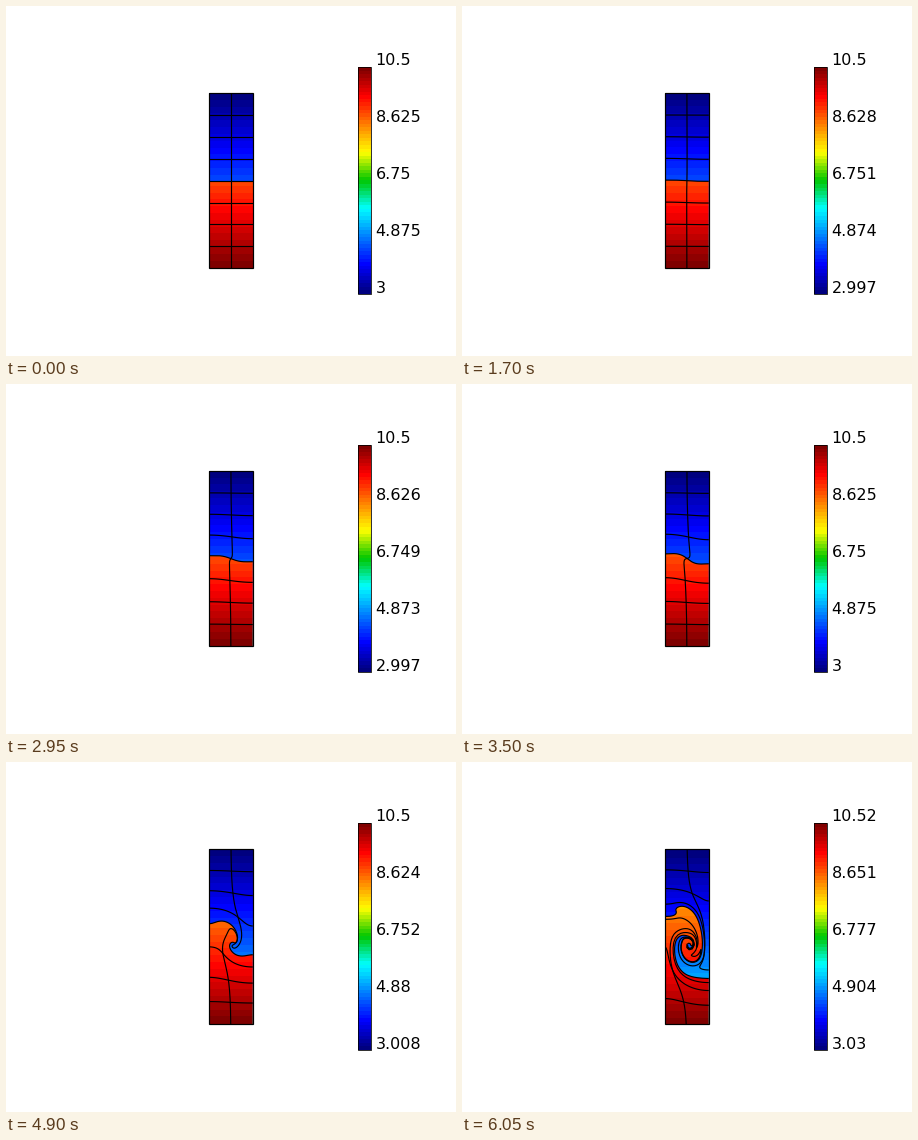
These frames come from a looping animation (450x350 px, 7100 ms). A matplotlib script:

```python
import numpy as np
import matplotlib.pyplot as plt
from matplotlib.animation import FuncAnimation
from matplotlib.colors import LinearSegmentedColormap
from matplotlib.patches import Rectangle
from matplotlib.path import Path

W, H, DPI = 450, 350, 100
PX = 72 / DPI                      # one pixel in points
CX, CY, SCALE = 224.9, 174.7, 87.5  # domain centre and pixels per unit
LEFT, RIGHT = CX - SCALE / 4, CX + SCALE / 4
TOP, BOTTOM = CY - SCALE, CY + SCALE
BAR = (352.3, 365, 61.3, 288.3)
FRAMES, INTERVAL, HOLD, STEPS = 142, 50, 21, 100

# Growth of the interface (left rise plus right fall, px) and value range.
KEYS = [0, 13, 38, 60, 77, 91, 100]
GROWTH = [0, 1.2, 6, 16.2, 31, 48.7, 62]
LOW_KEYS = [3, 2.9972, 2.997, 3.003, 3.008, 3.021, 3.0302]
HIGH_KEYS = [0, 7, 13, 38, 60, 68, 76, 77, 91, 100]
HIGHS = [10.5, 10.508, 10.5047, 10.5017, 10.499, 10.4935,
         10.4958, 10.496, 10.5048, 10.5243]

# Two-fluid vortex sheet, heavy fluid on top, mirrored at both side walls.
K = 2 * np.pi
N = 161
DA = 0.5 / (N - 1)
BLOB = 0.5 * (K * 0.035) ** 2
ATWOOD, GRAVITY, DT = 1 / 3, 1.2, 0.01
PUSHES = [(1, 0.0163), (3, -0.0016)]  # wave number, speed


def velocity(pts, sheet, strength):
    x, y = K * pts.T
    a, b = K * sheet.T
    ch = np.outer(np.cosh(y), np.cosh(b)) - np.outer(np.sinh(y), np.sinh(b))
    sh = np.outer(np.sinh(y), np.cosh(b)) - np.outer(np.cosh(y), np.sinh(b))
    cc, ss = np.outer(np.cos(x), np.cos(a)), np.outer(np.sin(x), np.sin(a))
    sc, cs = np.outer(np.sin(x), np.cos(a)), np.outer(np.cos(x), np.sin(a))
    near = strength / (2 * (ch - cc - ss + BLOB))
    far = strength / (2 * (ch - cc + ss + BLOB))
    u = -(sh * (near - far)).sum(axis=1)
    v = (near * (sc - cs) - far * (sc + cs)).sum(axis=1)
    # initial push, spread smoothly around the interface
    for n, speed in PUSHES:
        depth = 1.7 * n * pts[:, 1]
        push = speed / np.cosh(depth) ** 3.7
        u += push * np.tanh(depth) * np.sin(n * x)
        v += push * np.cos(n * x)
    return np.column_stack([u, v])


def start_lines():
    """Interface first, then the other level lines, then the centre line."""
    lines = [np.column_stack([np.linspace(0, 0.5, N), np.zeros(N)])]
    for level in (-0.75, -0.5, -0.25, 0.25, 0.5, 0.75):
        x = np.linspace(0, 0.5, 81)
        lines.append(np.column_stack([x, np.full_like(x, level)]))
    s = np.linspace(-1, 1, 241)
    lines.append(np.column_stack([np.full_like(s, 0.25), s * abs(s)]))
    return lines


def simulate(pts):
    gamma = np.zeros(N)
    previous = None
    history, growth = [pts.copy()], [0.0]
    for _ in range(700):
        sheet = pts[:N]
        vel = velocity(pts, sheet, gamma * DA)
        if previous is None:
            previous = vel
        accel = (vel[:N] - previous[:N]) / DT
        tangent = np.gradient(sheet, DA, axis=0)
        slip = gamma / np.hypot(*tangent.T)
        rate = ((accel * tangent).sum(axis=1) + GRAVITY * tangent[:, 1]
                + np.gradient(slip ** 2, DA) / 8)
        gamma = gamma + DT * 2 * ATWOOD * rate
        gamma[[0, -1]] = 0
        gamma[1:-1] += 0.08 * np.diff(gamma, 2)
        pts = pts + DT * (1.5 * vel - 0.5 * previous)
        previous = vel
        history.append(pts)
        growth.append((pts[0, 1] - pts[N - 1, 1]) * SCALE)
        if growth[-1] > 64:
            break
    return np.array(history), np.array(growth)


first = start_lines()
splits = np.cumsum([len(line) for line in first])[:-1]
history, growth = simulate(np.concatenate(first))


def points_at(step):
    """Line positions in pixels at an animation step."""
    unit = 1.97
    target = unit * np.sinh(np.interp(step, KEYS, np.arcsinh(np.array(GROWTH) / unit)))
    pos = np.interp(target, growth, np.arange(len(growth)))
    i = min(int(pos), len(history) - 2)
    pts = history[i] + (pos - i) * (history[i + 1] - history[i])
    return np.column_stack([LEFT + SCALE * pts[:, 0], CY - SCALE * pts[:, 1]])


palette = LinearSegmentedColormap.from_list("bands", [
    (0, (0, 0, 0.5)), (0.125, (0, 0, 1)), (0.375, (0, 1, 1)),
    (0.5, (0, 0.78, 0)), (0.625, (1, 1, 0)), (0.875, (1, 0, 0)),
    (1, (0.5, 0, 0))], N=64)

fig = plt.figure(figsize=(W / DPI, H / DPI), dpi=DPI, facecolor="white")
ax = fig.add_axes([0, 0, 1, 1])


def gradient(values, left, right, top, bottom, zorder=1):
    return ax.imshow(values[:, None], cmap=palette, aspect="auto",
                     interpolation="nearest", origin="upper",
                     extent=(left, right, bottom, top), zorder=zorder)


def outline(left, right, top, bottom, width):
    ax.add_patch(Rectangle((left, top), right - left, bottom - top, fill=False,
                           ec="black", lw=width * PX, zorder=4))


depth = np.linspace(-1, 1, 350)
upper = gradient(4.5 + 1.5 * depth, LEFT, RIGHT, TOP, BOTTOM)
lower = gradient(9 + 1.5 * depth, LEFT, RIGHT, TOP, BOTTOM, 2)
gradient(np.arange(64)[::-1], *BAR)
outline(LEFT, RIGHT, TOP, BOTTOM, 1.2)
outline(*BAR, 0.8)

curves = [ax.plot([], [], color="black", lw=1.15 * PX, zorder=3,
                  solid_capstyle="butt")[0] for _ in first]
labels = [ax.text(369.5, 59 + 57 * i, "", family="DejaVu Sans",
                  size=16 * PX, va="baseline") for i in range(5)]
ax.set_xlim(0, W)
ax.set_ylim(H, 0)
ax.axis("off")


def update(frame):
    step = min(max(frame - HOLD, 0), STEPS)
    lines = np.split(points_at(step), splits)
    for curve, line in zip(curves, lines):
        curve.set_data(*line.T)
    region = np.vstack([lines[0], [(RIGHT, BOTTOM), (LEFT, BOTTOM)]])
    lower.set_clip_path(Path(region), ax.transData)

    low = np.interp(step, KEYS, LOW_KEYS)
    high = np.interp(step, HIGH_KEYS, HIGHS)
    for image in (upper, lower):
        image.set_clim(low, high)
    for i, label in enumerate(labels):
        label.set_text(f"{high + (low - high) * i / 4:.4g}")
    return [upper, lower, *curves, *labels]


anim = FuncAnimation(fig, update, frames=FRAMES, interval=INTERVAL,
                     repeat=True, repeat_delay=0, blit=False)
plt.show()
```
